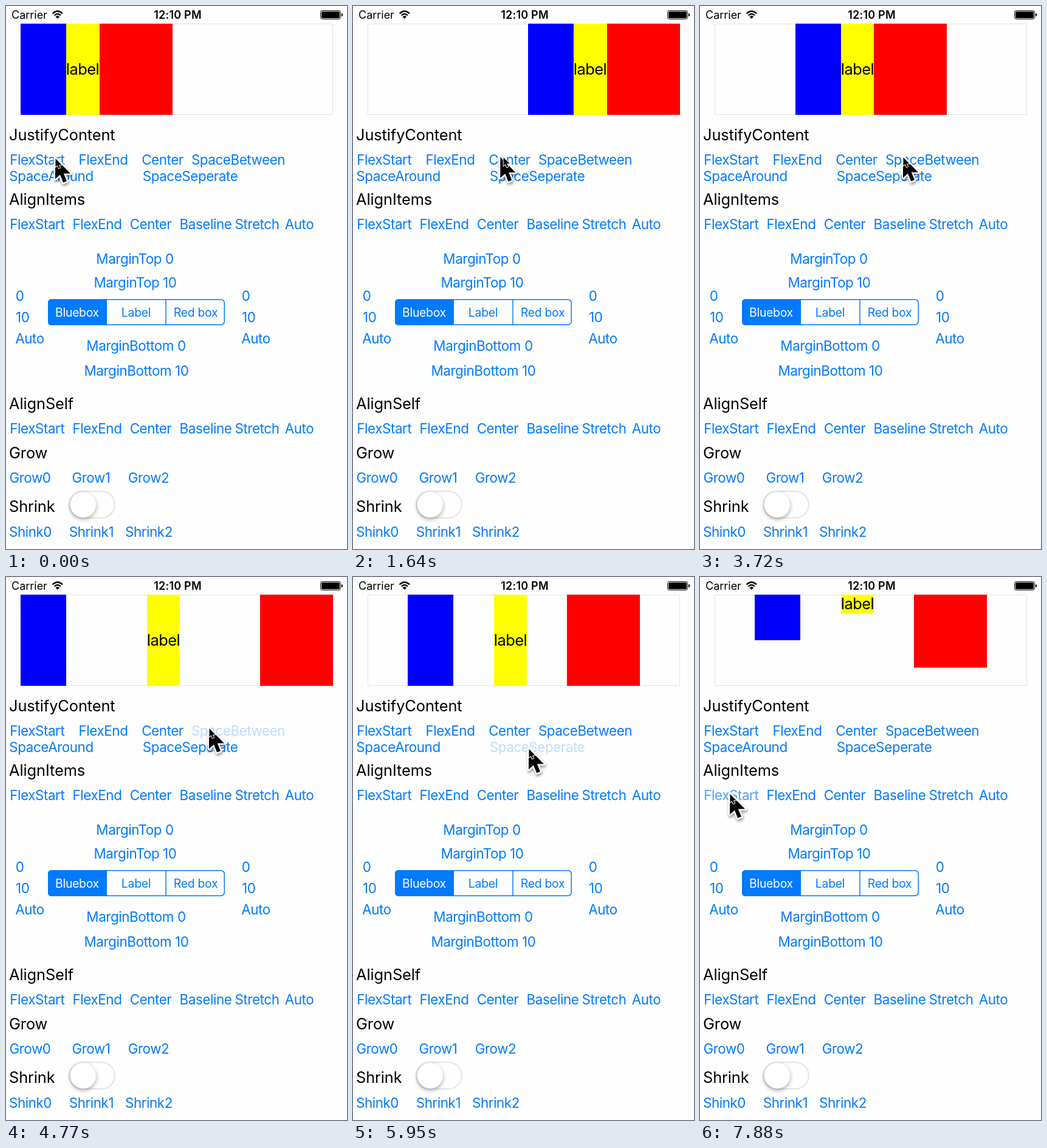
Recreate the animation shown at these times as an HTML page. Size 561 by 893 pixels, loop 8 s.

```html
<!DOCTYPE html>
<html lang="en">
<head>
<meta charset="utf-8">
<title>Flex layout demo</title>
<style>
  html, body { margin: 0; width: 100%; height: 100%; overflow: hidden; background: #fefefe; }
  svg { display: block; }
  text { font-family: Inter, Roboto, "Liberation Sans", sans-serif; font-optical-sizing: none; }
  .head { font-size: 25.4px; letter-spacing: -.004em; }
  .label { font-size: 25.4px; letter-spacing: -.02em; text-anchor: middle; }
  .btn { font-size: 22.4px; letter-spacing: -.019em; text-anchor: middle; fill: #007aff; }
  .seg { font-size: 19.4px; letter-spacing: -.015em; text-anchor: middle; fill: #007aff; }
  .status { font-size: 18px; }
  .clock { font-size: 18px; font-weight: 600; letter-spacing: .012em; text-anchor: middle; }
  .thumb { filter: drop-shadow(0 3px 3px rgba(0, 0, 0, .3)); }
  .pointer { filter: drop-shadow(1px 3px 2px rgba(0, 0, 0, .4)); }
</style>
</head>
<body>
<svg id="stage" width="561" height="893" viewBox="0 0 561 893"></svg>
<script>
const stage = document.getElementById('stage');
const BLUE = '#007aff';

function add(tag, attrs, content) {
  const el = document.createElementNS('http://www.w3.org/2000/svg', tag);
  set(el, attrs);
  if (content) el.textContent = content;
  stage.append(el);
  return el;
}
function set(el, attrs) {
  for (const k in attrs) el.setAttribute(k, attrs[k]);
}
const text = (cls, x, y, s) => add('text', { class: cls, x, y }, s);
const rect = (x, y, width, height, fill, more) =>
  add('rect', { x, y, width, height, fill, ...more });
const path = (d, more) => add('path', { d, ...more });
const row = (y, names, centers) => names.map((s, i) => text('btn', centers[i], y, s));

// Status bar
text('status', 9, 21, 'Carrier');
text('clock', 282.5, 21, '12:10 PM');
const arcs = { fill: 'none', stroke: '#000', 'stroke-width': 2.3 };
path('M76.6 12.4Q84.8 4.6 93 12.4', arcs);
path('M79.6 15.5Q84.8 10.4 90 15.5', arcs);
path('M84.8 21L81.4 17.4Q84.8 14.4 88.2 17.4Z');
rect(517.5, 7.5, 33, 14, 'none', { rx: 3, stroke: '#000' });
rect(519, 9, 30, 11, '#000', { rx: 1.5 });
path('M552 12Q554.2 12 554.2 14.5T552 17Z');

// Flex container and its three children
rect(24.5, 29.5, 513, 149, 'none', { stroke: '#e2e2e2' });
const blueBox = rect(24, 29, 75, 150, '#00f');
const labelBox = rect(99, 29, 55, 150, '#ff0');
const redBox = rect(154, 29, 120, 150, '#f00');
const label = text('label', 126, 113, 'label');

// Headings
[['JustifyContent', 221], ['AlignItems', 327], ['AlignSelf', 663], ['Grow', 744], ['Shrink', 832]]
  .forEach(([s, y]) => text('head', 5, y, s));

// Buttons
const alignNames = ['FlexStart', 'FlexEnd', 'Center', 'Baseline', 'Stretch', 'Auto'];
const alignX = [51.3, 150, 238, 328.5, 413, 482.5];
const justify = row(261, ['FlexStart', 'FlexEnd', 'Center', 'SpaceBetween'], [51.3, 160, 257.5, 382]);
const spaced = row(288, ['SpaceAround', 'SpaceSeperate'], [74.5, 303]);
const align = row(367, alignNames, alignX);
row(703, alignNames, alignX);
row(784, ['Grow0', 'Grow1', 'Grow2'], [39.5, 140, 234.5]);
row(872.5, ['Shink0', 'Shrink1', 'Shrink2'], [40, 140.5, 235]);
text('btn', 212, 424, 'MarginTop 0');
text('btn', 212.5, 463, 'MarginTop 10');
text('btn', 214, 566.5, 'MarginBottom 0');
text('btn', 214.5, 607.5, 'MarginBottom 10');
for (const x of [0, 372]) {
  text('btn', x + 22.7, 484.5, '0');
  text('btn', x + 27.3, 520, '10');
  text('btn', x + 39, 555, 'Auto');
}

// Segmented control
path('M166 482H75Q69 482 69 488V519Q69 525 75 525H166Z', { fill: BLUE });
rect(69.75, 482.75, 289.5, 41.5, 'none', { rx: 5.5, stroke: BLUE, 'stroke-width': 1.5 });
path('M263 483V524', { stroke: BLUE, 'stroke-width': 1.5 });
text('seg', 117, 510.5, 'Bluebox').style.fill = '#fff';
text('seg', 214, 510.5, 'Label');
text('seg', 312, 510.5, 'Red box');

// Switch
rect(104.1, 798.1, 74.8, 43.8, '#fefefe', { rx: 21.9, stroke: '#e5e5e5', 'stroke-width': 2.2 });
add('circle', { cx: 127, cy: 820, r: 21.3, fill: '#fff', stroke: '#ddd', 'stroke-width': .6, class: 'thumb' });

// Pointer: a large arrow with a small one riding at its tip
const arrow = 'M0 0V34.5L8 27.5L13.2 40.5L19 38L13.8 25.5H25Z';
const outline = { fill: '#000', stroke: '#fff', 'paint-order': 'stroke', 'stroke-linejoin': 'round' };
const big = path(arrow, { ...outline, 'stroke-width': 5, class: 'pointer' });
const small = path(arrow, { ...outline, 'stroke-width': 5 });

const LOOP = 8000, TICK = 148.7;

// start tick, end tick, destination, easing
const smooth = u => u * u * (3 - 2 * u);
const linear = u => u;
const moves = [
  [.3, 2, 154, 250, smooth],
  [7.3, 12, 254, 248, smooth],
  [21.3, 25, 334, 248, smooth],
  [34.3, 37, 289, 282, smooth],
  [42.3, 45, 118.5, 317.5, u => u * (.5 + u / 2)],
  [45, 47, 55, 358, linear],
  [47, 48, 49, 356, linear]
];
function pointerAt(tick) {
  let x = 81, y = 250;
  for (const [from, to, toX, toY, ease] of moves) {
    if (tick <= from) break;
    const k = ease(Math.min(1, (tick - from) / (to - from)));
    x += (toX - x) * k;
    y += (toY - y) * k;
  }
  return [x, y];
}

// tick, pressed button, its first opacity, x of blue / label / red, label width
const taps = [
  [4, justify[1], .5, 288, 363, 418, 55],
  [16, justify[2], .25, 157, 232, 286, 54],
  [32, justify[3], .25, 24, 232, 418, 54],
  [40, spaced[1], .25, 90, 232, 352, 54],
  [51, align[0], .2, 90, 232, 352, 54]
];

function draw(ms) {
  const tick = Math.floor((ms % LOOP + 5) / TICK);
  let place = [24, 99, 154, 55];
  for (const [at, button, first, ...xs] of taps) {
    const on = tick >= at;
    if (on) place = xs;
    button.style.fillOpacity = on ? Math.min(1, first + .25 * (tick - at)) : 1;
  }
  const top = tick >= 51;
  const [bx, lx, rx, lw] = place;
  set(blueBox, { x: bx, height: top ? 75 : 150 });
  set(labelBox, { x: lx, width: lw, height: top ? 31 : 150 });
  set(redBox, { x: rx, height: top ? 120 : 150 });
  set(label, { x: lx + 27, y: top ? 53 : 113 });

  const [x, y] = pointerAt(tick);
  const [sx, sy] = pointerAt(tick + .25);
  set(big, { transform: `translate(${x} ${y})` });
  set(small, { transform: `translate(${sx + .5} ${sy + 1}) scale(.4)` });
}
function loop(now) {
  draw(now);
  requestAnimationFrame(loop);
}
draw(0);
requestAnimationFrame(loop);
</script>
</body>
</html>
```
